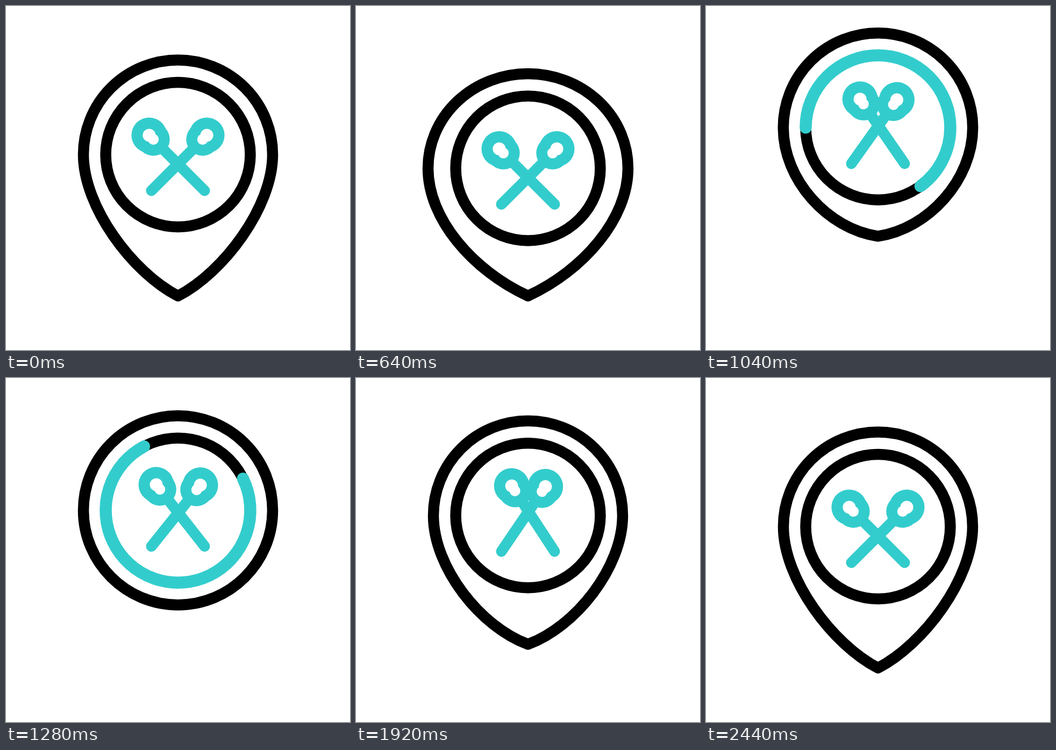
An HTML page with a canvas that plays this animation: 640x640 px, repeating every 3000 ms.

```html
<!DOCTYPE html>
<html>
<head>
<meta charset="utf-8">
<style>
html, body { margin: 0; width: 100%; height: 100%; overflow: hidden; background: #fff; }
canvas { display: block; width: 100vmin; height: 100vmin; }
</style>
</head>
<body>
<canvas width="640" height="640"></canvas>
<script>
const ctx = document.querySelector('canvas').getContext('2d');
const TEAL = '#33cccc', RAD = Math.PI / 180, LOOP = 3000, STEP = 40;

const smooth = p => p * p * (3 - 2 * p);
const easeOut = p => p * (2 - p);
const linear = p => p;

// Keys are [time, value, easing towards this key]
const centerY = [[0, 276.5], [600, 302], [633, 302], [1080, 224.5], [1700, 264.5, easeOut],
  [1833, 224.5], [2033, 302], [2433, 276.5]];
const squash = [[0, 0], [600, 1], [633, 1], [1080, 0]];
const pointed = [[0, 1], [633, 1], [1080, .29], [1250, 0, easeOut], [1700, 0], [2033, 1]];
const blade = [[633, 45], [1067, 34.5], [1700, 48.2], [1900, 33], [2167, 45]];
const arcTail = [[667, -36], [1040, 180, linear], [1280, 334, linear], [1600, 664, linear], [1667, 684, easeOut]];
const arcHead = [[667, -36], [1040, 414, linear], [1280, 602, easeOut], [1600, 682, easeOut], [1667, 684, linear]];

function at(keys, t) {
  const i = keys.findIndex(k => k[0] > t);
  if (i < 0) return keys[keys.length - 1][1];
  if (i === 0) return keys[0][1];
  const [t0, v0] = keys[i - 1], [t1, v1, ease = smooth] = keys[i];
  return v0 + (v1 - v0) * ease((t - t0) / (t1 - t0));
}

function stroke(color, width) {
  ctx.strokeStyle = color;
  ctx.lineWidth = width;
  ctx.stroke();
}

function disc(y, r, color) {
  ctx.beginPath();
  ctx.arc(0, y, r, 0, 7);
  ctx.fillStyle = color;
  ctx.fill();
}

function drawPin(s, m) {
  const rx = 176 + 10 * s, sideY = 97 - 3 * s;
  const tipX = 97 - 12 * m + 18 * s, tipY = 176 + 43 * m - 29 * s;
  const bottom = 176 + 87 * m - 25.5 * s;
  ctx.beginPath();
  ctx.ellipse(0, 0, rx, 176, 0, Math.PI, 2 * Math.PI);
  ctx.bezierCurveTo(rx, sideY, tipX, tipY, 0, bottom);
  ctx.bezierCurveTo(-tipX, tipY, -rx, sideY, -rx, 0);
  ctx.closePath();
  stroke('#000', 20.5);
}

// One half of the scissors, turning about its lower end
function drawBlade(x, angle) {
  ctx.save();
  ctx.translate(x, 67);
  ctx.rotate(angle * RAD);
  ctx.beginPath();
  ctx.moveTo(0, 0);
  ctx.lineTo(0, -112);
  stroke(TEAL, 20);
  disc(-145.8, 33, TEAL);
  disc(-134.8, 30.5, TEAL);
  disc(-145.8, 12, '#fff');
  disc(-134.8, 10, '#fff');
  ctx.restore();
}

function draw(t) {
  ctx.fillStyle = '#fff';
  ctx.fillRect(0, 0, 640, 640);
  ctx.save();
  ctx.translate(320, at(centerY, t));
  ctx.lineCap = ctx.lineJoin = 'round';

  drawPin(at(squash, t), at(pointed, t));

  ctx.beginPath();
  ctx.arc(0, 0, 134.5, 0, 7);
  stroke('#000', 20.5);

  const tail = at(arcTail, t), head = at(arcHead, t);
  if (head - tail > .5) {
    ctx.beginPath();
    ctx.arc(0, 0, 134.5, tail * RAD, head * RAD);
    stroke(TEAL, 22.5);
  }

  const angle = at(blade, t);
  drawBlade(49.5, -angle);
  drawBlade(-49.5, angle < 45 ? 45 + (angle - 45) * .92 : angle);
  ctx.restore();
}

function tick() {
  draw(Math.floor(performance.now() % LOOP / STEP) * STEP);
  requestAnimationFrame(tick);
}
tick();
</script>
</body>
</html>
```
